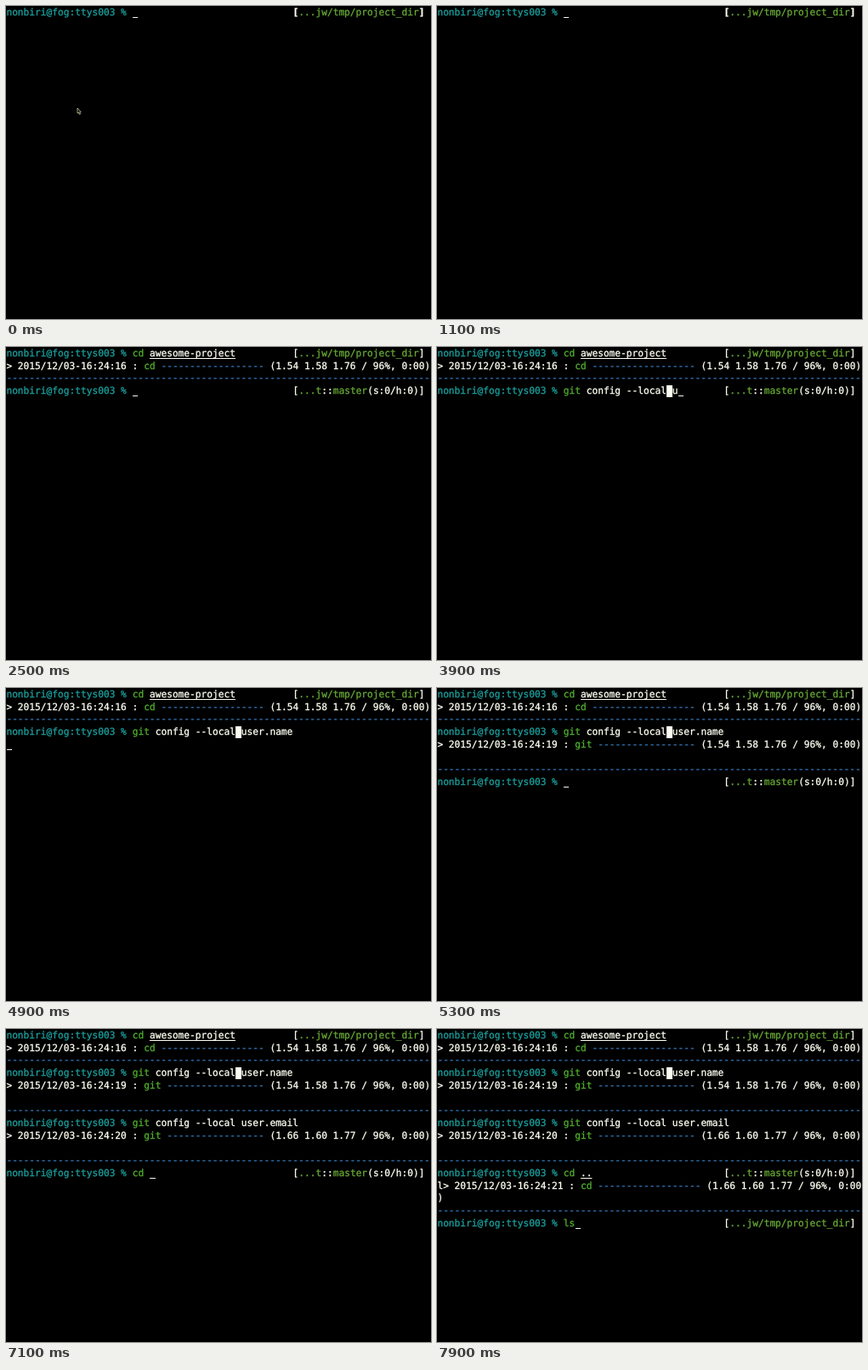
An HTML page for the animation above (8000 ms loop, 500 by 368 pixels).

```html
<!DOCTYPE html>
<html lang="en">
<head>
<meta charset="utf-8">
<title>Terminal session</title>
<style>
  html, body { margin: 0; width: 100%; height: 100%; overflow: hidden; background: #000; }
  #stage { position: relative; width: 500px; height: 368px; overflow: hidden; background: #000; }
  #screen span, #screen i {
    position: absolute;
    white-space: pre;
    font: 11.2px/14.72px "DejaVu Sans Mono", "Liberation Mono", monospace;
    text-rendering: geometricPrecision;
    font-variant-ligatures: none;
    -webkit-text-stroke: 0.3px currentColor;
  }
  #screen i { width: 6.4px; }
  #screen .path { text-decoration: underline 1px; text-underline-offset: 2px; }
  #screen .bold { font-weight: bold; }
  #pointer { position: absolute; left: 83px; top: 119px; }
</style>
</head>
<body>
<div id="stage">
  <div id="screen"></div>
  <svg id="pointer" width="7" height="10" viewBox="0 0 7 10">
    <path d="M1 1V7.2L2.4 6L3.4 8.4L4.5 8L3.6 5.7H5.2Z" fill="#000" stroke="#c8c8a0" stroke-width=".8"/>
  </svg>
</div>
<script>
const LOOP = 8000, STEP = 100, COLS = 74;
const CELL = 6.742, LINE = 14.72, LEFT = 0.4, TEXT_TOP = 0.9;
const WHITE = '#fefef2', PROMPT = '#1b9f9c', COMMAND = '#4fae2e', PATH = '#66a834', DASH = '#3274b2';

const DIR = [['[', WHITE], ['...jw/tmp/project_dir', PATH], [']', WHITE]];
const REPO = [['[', WHITE], ['...t', PATH], ['::', WHITE], ['master', PATH], ['(s:0/h:0)]', WHITE]];
const GIT = 'git config --local';

// Each prompt: when it appears, what has been typed by when, and its status line.
const prompts = [
  { row: 0, at: 0, right: DIR, enter: 2100, status: 2200,
    keys: [[1500, 'c'], [1600, 'cd '], [1800, 'cd a'], [1900, 'cd awesome-project/'], [2100, 'cd awesome-project']],
    clock: '16', load: '1.54 1.58 1.76', rule: 2300, ruleRow: 2 },
  { row: 3, at: 2400, right: REPO, enter: 4400, status: 5000,
    keys: [[2600, 'g'], [2700, 'gi'], [2800, 'git'], [2900, 'git '], [3000, 'git conf'],
           [3100, 'git config --'], [3200, GIT], [3900, GIT + ' u'], [4000, GIT + ' use'],
           [4100, GIT + ' user.'], [4200, GIT + ' user.na'], [4300, GIT + ' user.name']],
    clock: '19', load: '1.54 1.58 1.76', rule: 5100, ruleRow: 6 },
  { row: 7, at: 5200, right: REPO, enter: 6200, status: 6400,
    keys: [[5500, GIT + ' user.name'], [5800, GIT + ' user.na'], [5900, GIT + ' user.'],
           [6100, GIT + ' user.email']],
    clock: '20', load: '1.66 1.60 1.77', rule: 6500, ruleRow: 10 },
  { row: 11, at: 6600, right: REPO, enter: 7200, status: 7400, early: 'l', earlyAt: 7300,
    keys: [[6900, 'c'], [7000, 'cd'], [7100, 'cd '], [7200, 'cd ..']],
    clock: '21', load: '1.66 1.60 1.77', rule: 7400, ruleRow: 14 },
  { row: 15, at: 7500, right: DIR, enter: LOOP, keys: [[7500, 'l'], [7600, 'ls']] }
];

const screen = document.getElementById('screen');
const pointer = document.getElementById('pointer');

function put(row, col, text, color, cls = '') {
  const el = document.createElement('span');
  el.textContent = text;
  el.className = cls;
  el.style.cssText = `left:${LEFT + col * CELL}px;top:${TEXT_TOP + row * LINE}px;color:${color}`;
  screen.append(el);
  return col + text.length;
}

function bar(row, col, top, height) {
  const el = document.createElement('i');
  el.style.cssText = `left:${LEFT + col * CELL + 0.3}px;top:${row * LINE + top}px;height:${height}px;background:${WHITE}`;
  screen.append(el);
}

const underscore = (row, col) => bar(row, col, 13, 1);

function drawRight(p, heavy) {
  let col = 50;
  for (const [text, color] of p.right)
    col = put(p.row, col, text, color, heavy && color === WHITE ? 'bold' : '');
}

function drawCommand(row, text) {
  const [word, ...rest] = text.split(' ');
  const known = ['cd', 'git', 'ls'].includes(word);
  const col = put(row, 22, word, known ? COMMAND : WHITE);
  const args = rest.join(' ');
  if (args) put(row, col + 1, args, WHITE, word === 'cd' ? 'path' : '');
}

function drawStatus(p, command) {
  const row = p.row + 1, word = command.split(' ')[0];
  let col = put(row, 0, (p.early || '') + `> 2015/12/03-16:24:${p.clock} : `, WHITE);
  col = put(row, col, word, COMMAND) + 1;
  col = put(row, col, '-'.repeat(20 - word.length), DASH) + 1;
  const tail = `(${p.load} / 96%, 0:00)`, room = COLS - col;
  put(row, col, tail.slice(0, room), WHITE);
  if (tail.length > room) put(row + 1, 0, tail.slice(room), WHITE);
}

function drawPrompt(p, t) {
  let text = '';
  for (const [at, typed] of p.keys) if (t >= at) text = typed;
  put(p.row, 0, 'nonbiri@fog:ttys003 %', PROMPT);
  drawCommand(p.row, text);
  if (text.length < 28) drawRight(p, p.row === 0 && t < p.enter);

  if (t < p.enter) underscore(p.row, 22 + text.length);
  else if (t < p.status) {
    const early = t >= p.earlyAt ? p.early : '';
    put(p.row + 1, 0, early, WHITE);
    underscore(p.row + 1, early.length);
  } else {
    drawStatus(p, text);
    if (t >= p.rule) put(p.ruleRow, 0, '-'.repeat(COLS), DASH);
  }
}

function draw(t) {
  screen.replaceChildren();
  for (const p of prompts) if (t >= p.at) drawPrompt(p, t);
  if (t >= 3900) bar(3, 40, 0.6, 14);
  pointer.style.opacity = Math.max(0, 1 - t / 400);
}

let shown = -1;
function tick() {
  const t = Math.floor((performance.now() % LOOP) / STEP) * STEP;
  if (t !== shown) draw(shown = t);
  requestAnimationFrame(tick);
}
tick();
</script>
</body>
</html>
```
